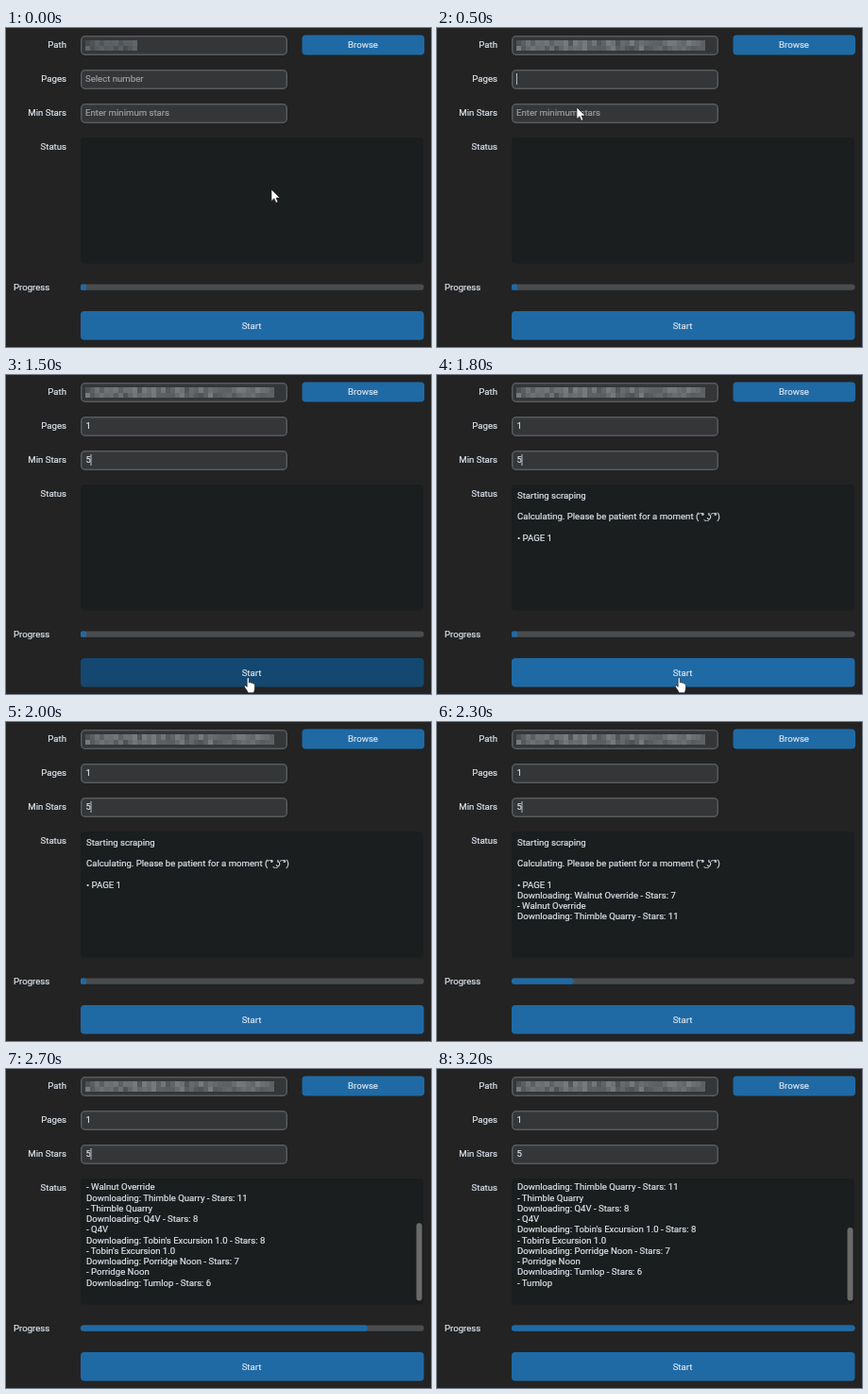
Animation, 450 px wide and 338 px high, one loop 3.3 s. Source, as an HTML page:

```html
<!DOCTYPE html>
<html lang="en">
<head>
<meta charset="utf-8">
<title>Scraper window</title>
<style>
  html, body { margin: 0; width: 100%; height: 100%; overflow: hidden; background: #232323; }
  svg { display: block; width: 100%; height: 100%; }
  text { font: 9.6px Roboto, "DejaVu Sans", sans-serif; fill: #dce4ee; stroke: #dce4ee; stroke-width: .2; white-space: pre; }
  .hint { fill: #9e9e9e; stroke: #9e9e9e; }
</style>
</head>
<body>
<svg id="stage" viewBox="0 0 450 338"></svg>
<script>
const LOOP = 3300, STEP = 100;
const BLUE = '#1f6aa5', HOVER = '#144870';
const LINE = 11.24;
const stage = document.getElementById('stage');

const games = [['Walnut Override', 7], ['Thimble Quarry', 11], ['Q4V', 8],
  ["Tobin's Excursion 1.0", 8], ['Porridge Noon', 7], ['Tumlop', 6]];
const log = ['Starting scraping', '', 'Calculating. Please be patient for a moment ( ͡° ͜ʖ ͡°)', '', '• PAGE 1',
  ...games.flatMap(([name, stars]) => [`Downloading: ${name} - Stars: ${stars}`, `- ${name}`])];

// Pointer keys: [start ms, x, y, shape]
const pointerKeys = [[0, 281, 171, 'arrow'], [100, 330, 110, 'arrow'], [200, 378, 40, 'arrow'],
  [300, 361, 15, 'hand'], [500, 148, 84, 'arrow'], [1100, 165, 118, 'arrow'], [1200, 180, 165, 'arrow'],
  [1300, 205, 220, 'arrow'], [1400, 235, 275, 'arrow'], [1500, 252, 320, 'hand'], [2000, 0, 0, 'none']];
const shapes = {
  arrow: 'M0 0V12.4L2.9 9.7L4.9 14.2L6.9 13.3L5 9H9Z',
  hand: 'M3.2 1.2Q4.3 0 5.3 1.2V6Q6.6 5.1 7.4 6.3Q8.7 5.6 9.4 6.9Q11.3 6.4 11.5 8.4V12Q11.3 14 10.3 16.8H4.3Q3.8 14.8 .6 10.8Q0 9.2 1.5 9L3.2 10.4Z',
  none: ''
};

const rect = (x, y, w, h, fill, r = 0, extra = '') =>
  `<rect x="${x}" y="${y}" width="${w}" height="${h}" rx="${r}" fill="${fill}" ${extra}/>`;
const text = (str, x, y, anchor = 'start', cls = '') =>
  `<text x="${x}" y="${y}" text-anchor="${anchor}" class="${cls}">${str}</text>`;
const field = y => rect(79.75, y + .75, 217.5, 19.5, '#343638', 4, 'stroke="#565b5e" stroke-width="1.5"');
const caret = (x, y) => rect(x, y, 1, 12, '#b4babf');

function mosaic(width, base, spread) {
  let seed = 7, out = '';
  for (let x = 0; x < width; x += 5) {
    for (let row = 0; row < 2; row++) {
      seed = seed * 16807 % 2147483647;
      const v = Math.round(base + spread * (seed / 2147483647 - .5));
      out += rect(84 + x, 13 + row * 5.5, Math.min(5, width - x), 5.5, `rgb(${v},${v + 3},${v + 6})`);
    }
  }
  return `<g shape-rendering="crispEdges">${out}</g>`;
}
const shortPath = mosaic(55, 86, 30), longPath = mosaic(200, 100, 44);

const frame = rect(0, 0, 450, 338, '#232323') + [8, 44, 80].map(field).join('') +
  rect(313.5, 7.5, 129.5, 21, BLUE, 4) + text('Browse', 378, 21.3, 'middle') +
  ['Path', 'Pages', 'Min Stars', 'Status'].map((s, i) => text(s, 64, 21.3 + 36 * i, 'end')).join('') +
  text('Progress', 8, 278.1) + rect(79, 116, 363, 133.5, '#1b1e1e', 4) +
  rect(79, 271.5, 363.5, 6.2, '#4a4d50', 3) +
  '<clipPath id="view"><rect x="82" y="120.6" width="352" height="126"/></clipPath>';

function inputs(t) {
  let out = t < 300 ? shortPath : longPath;
  if (t < 300) out += text('Select number', 84, 57.3, 'start', 'hint');
  else if (t < 900) out += caret(t < 700 ? 84 : 89.5, 48);
  if (t >= 700) out += text('1', 84.5, 57.3);

  if (t < 900) return out + text('Enter minimum stars', 84, 93.3, 'start', 'hint');
  if (t < 1200) return out + caret(84, 84);
  const caretOn = t < 2400 || t === 2600 || t === 2700 || t === 2900 || t === 3100;
  return out + text('5', 84.5, 93.3) + (caretOn ? caret(89.5, 84) : '');
}

function status(t, done) {
  const count = t < 1700 ? 0 : t < 1800 ? 3 : t < 2100 ? 5 : Math.min(log.length, 6 + 2 * done);
  const top = count < 10 ? 130.7 : 229.5 - (count - 1) * LINE;
  const lines = log.slice(0, count).map((s, i) => text(s, 85, top + i * LINE)).join('');
  const thumb = 127 * 11 / (count + 1);
  return `<g clip-path="url(#view)">${lines}</g>` +
    (t >= 2600 ? rect(434.5, 245.5 - thumb, 6, thumb, '#6b6b6b', 3) : '');
}

function pointer(t) {
  const [, x, y, shape] = pointerKeys.findLast(key => key[0] <= t);
  return `<path d="${shapes[shape]}" transform="translate(${x} ${y})" fill="#fff" stroke="#111" stroke-width=".6"/>`;
}

function render(t) {
  const done = Math.max(0, Math.min(games.length, (t - 2200) / STEP));
  const hovered = t === 1500 || t === 1600;
  stage.innerHTML = frame + inputs(t) + status(t, done) +
    rect(79, 271.5, 6 + 357.5 * done / games.length, 6.2, BLUE, done ? 3 : 1.5) +
    rect(79, 300, 363.5, 30.5, hovered ? HOVER : BLUE, 4) + text('Start', 260, 318.6, 'middle') + pointer(t);
}

let shown = -1;
function tick() {
  const t = Math.floor(performance.now() % LOOP / STEP) * STEP;
  if (t !== shown) render(shown = t);
  requestAnimationFrame(tick);
}
tick();
</script>
</body>
</html>
```
